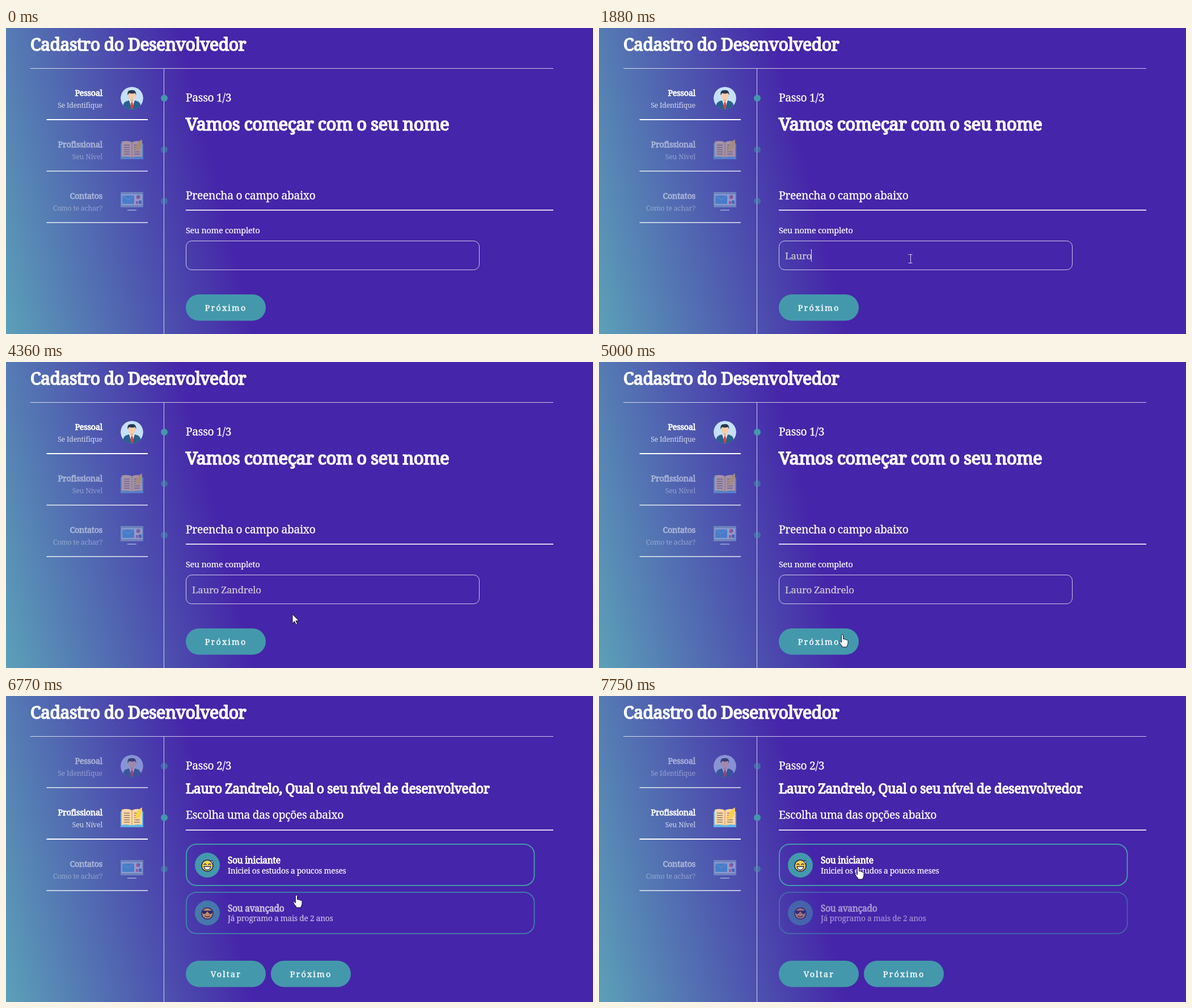
An HTML page for the animation above (8000 ms loop, 1035x541 px).

```html
<!DOCTYPE html>
<html lang="pt-BR">
<head>
<meta charset="utf-8">
<title>Cadastro</title>
<style>
  html, body { margin: 0; width: 100%; height: 100%; overflow: hidden; }
  body { background: linear-gradient(76.5deg, #5ca0b8, #4525a9 37.8%) no-repeat 0 0 / 1035px 541px; }
  svg { display: block; width: 1035px; height: 541px; }
  text {
    font: 19.4px "Noto Serif", serif; letter-spacing: -.02em; white-space: pre;
    fill: #fff; stroke: #fff; stroke-width: .014em;
  }
  .bold { stroke-width: .055em; }
  .title { font-size: 30.3px; }
  .lead { font-size: 31.2px; }
  .question { font-size: 23px; }
  .option { font-size: 15.6px; }
  .label { font-size: 14.5px; }
  .detail { font-size: 13.8px; }
  .hint { font-size: 12.4px; opacity: .75; stroke: none; }
  .typed { font-size: 17px; fill: #cfcbd3; stroke: #cfcbd3; }
  .end { text-anchor: end; }
  .button text { font-size: 14.5px; letter-spacing: 2.1px; text-anchor: middle; stroke-width: .025em; }
  .teal { fill: #4498ac; }
  .card { fill: none; stroke: #4498ac; stroke-width: 2; }
  .rule { stroke: #fff; stroke-opacity: .8; stroke-width: 2; }
  .thin { stroke: #fff; stroke-opacity: .75; }
  .item .fade { opacity: .5; }
  .item .under { stroke: #fff; stroke-width: 2; opacity: .65; }
  .item.on > * { opacity: 1; }
  .ink { fill: none; stroke: #1d2350; stroke-width: 1.5; stroke-linecap: round; }
  .pointer { fill: #fff; stroke: #15152a; stroke-linejoin: round; }
</style>
</head>
<body>
<svg viewBox="0 0 1035 541">
  <defs>
    <clipPath id="disc"><circle r="20"/></clipPath>
    <g id="person" clip-path="url(#disc)">
      <circle r="20" fill="#c4e0fb"/>
      <path d="M-15 20V11Q-14 6-5 4H5Q14 6 15 11V20Z" fill="#28628c"/>
      <path d="M-5 3L0 20 5 3Z" fill="#fff"/>
      <path d="M-1.500 7H1.500L2.500 16 0 20-2.500 16Z" fill="#d8414c"/>
      <path d="M-3 0H3V5L0 8-3 5Z" fill="#e9b18e"/>
      <ellipse cy="-5" rx="6.500" ry="8" fill="#f7cba9"/>
      <path d="M-7.500-5Q-9-14-2-14 8-16 7.500-5L5.500-9Q0-7-5-9Z" fill="#26394f"/>
    </g>
    <g id="book">
      <path d="M-20-11H20V17H-20Z" fill="#5fb4e5"/>
      <path d="M-18-14Q-8-17 0-13 8-17 18-14V13Q8 11 0 14-8 11-18 13Z" fill="#fbd7a3"/>
      <path d="M0-13V14" stroke="#d98b5f"/>
      <path d="M-14-8h10m-10 4h10m-10 4h10m-10 4h10m-10 4h10M4-8h6M4-4h6M4 0h6M4 4h10M4 8h10" stroke="#5a4b58" stroke-width="1.200"/>
      <path d="M5 6Q6-13 18-18 18-3 11 2L8 1Z" fill="#fcd04c"/>
    </g>
    <g id="monitor">
      <rect x="-20" y="-16" width="40" height="27" rx="1.500" fill="#8fb4cb"/>
      <rect x="-18" y="-12" width="36" height="19" fill="#cfe6f4"/>
      <path d="M-17-10H4V5H-17Z" fill="#42a6e6"/>
      <path d="M-17-10L-6.500-2 4-10" fill="none" stroke="#8fcbf3"/>
      <circle cx="11" cy="-7" r="3.500" fill="#e4616e"/>
      <path d="M11-7v-3.500a3.500 3.500 0 0 1 3.500 3.500Z" fill="#3a7fc4"/>
      <path d="M7 0h4v5H7Z" fill="#e4616e"/>
      <path d="M12-1h5v6h-5Z" fill="#3a7fc4"/>
      <path d="M-8 16H8" stroke="#c8dce8" stroke-width="2"/>
    </g>
    <g id="laugh">
      <circle r="10" fill="#fbd34f" stroke="#1d2350" stroke-width="1.500"/>
      <path class="ink" d="M-6-2q2-2.500 4 0M2-2q2-2.500 4 0"/>
      <path d="M-6 1.500H6Q5 7.500 0 7.500T-6 1.500Z" fill="#fff" stroke="#1d2350" stroke-width="1.300"/>
      <path d="M8-10Q12-5 9-4 5-5 8-10Z" fill="#8fd3f2" stroke="#1d2350"/>
    </g>
    <g id="cool">
      <circle r="10" fill="#f4b04a" stroke="#1d2350" stroke-width="1.500"/>
      <path d="M-10-5H10L8 0Q4 3 1-3H-1Q-4 3-8 0Z" fill="#1d2350"/>
      <path class="ink" d="M-4 4.500Q0 7.500 4 4.500"/>
    </g>
  </defs>

  <text class="bold title" x="43" y="40">Cadastro do Desenvolvedor</text>
  <path class="thin" d="M43 71.500H965M278.500 72V541"/>
  <g id="menu"></g>

  <text id="step" x="317" y="130"></text>

  <g id="first">
    <text class="bold lead" x="317" y="181">Vamos começar com o seu nome</text>
    <text x="317" y="302.500">Preencha o campo abaixo</text>
    <path class="rule" d="M317 322H965"/>
    <text class="label" x="317" y="362.500">Seu nome completo</text>
    <rect class="thin" x="317.500" y="376.500" width="517" height="51" rx="10" fill="none"/>
    <text id="typed" class="typed" x="328" y="408.500"></text>
    <path id="caret" d="M0 391V413" stroke="#e6e3ee"/>
    <g class="button">
      <rect class="teal" x="317" y="471" width="141" height="46.500" rx="23.250"/>
      <text x="387.500" y="500">Próximo</text>
    </g>
  </g>

  <g id="second">
    <text id="question" class="bold question" x="317" y="172"></text>
    <text x="317" y="217">Escolha uma das opções abaixo</text>
    <path class="rule" d="M317 237H965"/>
    <g>
      <rect class="card" x="318" y="262" width="613.500" height="73" rx="18"/>
      <circle class="teal" cx="355" cy="299" r="22"/>
      <use href="#laugh" x="355" y="300"/>
      <text class="bold option" x="391" y="296">Sou iniciante</text>
      <text class="detail" x="391" y="313.500">Iniciei os estudos a poucos meses</text>
    </g>
    <g id="advanced">
      <rect class="card" x="318" y="347" width="613.500" height="73" rx="18"/>
      <circle class="teal" cx="355" cy="383.500" r="22"/>
      <use href="#cool" x="355" y="384.500"/>
      <text class="bold option" x="391" y="380.500">Sou avançado</text>
      <text class="detail" x="391" y="398">Já programo a mais de 2 anos</text>
    </g>
    <g class="button">
      <rect class="teal" x="317" y="468" width="141" height="46.500" rx="23.250"/>
      <text x="388" y="497">Voltar</text>
      <rect class="teal" x="467" y="468" width="141" height="46.500" rx="23.250"/>
      <text x="537.500" y="497">Próximo</text>
    </g>
  </g>

  <g id="cursor">
    <circle id="click" r="11.500" fill="#ff0" opacity=".47"/>
    <path id="arrow" class="pointer" d="M0 0V16L3.800 12.500 6.200 18 8.600 17 6.200 11.500H11.300Z"/>
    <path id="hand" class="pointer" d="M-1.600 14V1.500a1.600 1.600 0 0 1 3.200 0V8q1.400-1.200 2.800.5 1.600-.8 2.800.9 2-.6 2.800 1.200V15q0 3-2 5.500V22H-.5V20Q-3 18-5.600 12.500-5.600 10.800-4 11.500Z"/>
    <path id="beam" d="M-3.500-7.500H3.500M.5-7V7M-3.500 7.500H3.500" fill="none" stroke="#d5d0e6"/>
  </g>
</svg>
<script>
const LOOP = 8000, SWITCH = 5800;
const NAME = "Lauro Zandrelo";
const KEY_TIMES = [1140, 1550, 1640, 1740, 1880, 2280, 2680, 2950, 3060, 3170, 3280, 3380, 3480, 3620];
// time, x, y of the pointer's hot spot
const PATH = [
  [120, 922, 546], [420, 680, 478], [690, 549, 408],
  [4020, 549, 408], [4400, 500, 450], [4740, 429, 482],
  [5930, 429, 482], [6560, 505, 430], [6770, 512, 352], [7000, 473, 313], [7330, 457, 302]
];
const MENU = [
  ["Pessoal", "Se Identifique", "person"],
  ["Profissional", "Seu Nível", "book"],
  ["Contatos", "Como te achar?", "monitor"]
];
const $ = id => document.getElementById(id);
const show = (id, on) => { $(id).style.display = on ? "" : "none"; };
const between = (t, a, b) => t >= a && t < b;
const clamp = v => Math.max(0, Math.min(1, v));

$("menu").innerHTML = MENU.map(([name, hint, icon], i) => `
  <g class="item" transform="translate(0 ${i * 91})">
    <g class="fade">
      <text class="bold label end" x="170" y="119.500">${name}</text>
      <text class="hint end" x="170" y="141">${hint}</text>
      <use href="#${icon}" x="222" y="124"/>
      <circle class="teal" cx="279" cy="124" r="6"/>
    </g>
    <path class="under" d="M71.500 162H250"/>
  </g>`).join("");
$("question").textContent = NAME + ", Qual o seu nível de desenvolvedor";

function pointerAt(t) {
  const next = PATH.findIndex(p => p[0] > t);
  if (next === 0) return PATH[0].slice(1);
  if (next < 0) return PATH.at(-1).slice(1);
  const [t0, x0, y0] = PATH[next - 1], [t1, x1, y1] = PATH[next];
  const k = (t - t0) / (t1 - t0);
  return [x0 + (x1 - x0) * k, y0 + (y1 - y0) * k];
}

function pointerKind(x, y, second) {
  const inside = (l, t, r, b) => between(x, l, r) && between(y, t, b);
  if (!second && inside(317, 376, 835, 429)) return "beam";
  const active = second
    ? inside(317, 261, 933, 336) || inside(317, 346, 933, 421) || inside(317, 468, 458, 515) || inside(467, 468, 608, 515)
    : inside(317, 471, 458, 518);
  return active ? "hand" : "arrow";
}

function draw(t) {
  const second = t >= SWITCH;
  show("first", !second);
  show("second", second);
  $("step").textContent = `Passo ${second ? 2 : 1}/3`;
  [...$("menu").children].forEach((item, i) => item.classList.toggle("on", i === +second));

  const typed = $("typed");
  typed.textContent = NAME.slice(0, KEY_TIMES.filter(k => k <= t).length);
  show("caret", between(t, 880, 4020));
  if (!second) {
    const width = typed.textContent ? typed.getComputedTextLength() : 0;
    $("caret").setAttribute("transform", `translate(${Math.round(328 + width) - .5} 0)`);
  }

  const rise = clamp((t - 6630) / 250), fall = (1 - clamp((t - 6880) / 870)) ** 2;
  $("advanced").style.opacity = .5 + .35 * rise * fall;

  const [x, y] = pointerAt(t), kind = pointerKind(x, y, second);
  $("cursor").setAttribute("transform", `translate(${Math.round(x)} ${Math.round(y)})`);
  for (const id of ["arrow", "hand", "beam"]) show(id, id === kind);
  show("click", between(t, 810, 880) || between(t, 4860, 5000));
}

const start = performance.now();
function tick() {
  draw((performance.now() - start) % LOOP);
  requestAnimationFrame(tick);
}
tick();
</script>
</body>
</html>
```
